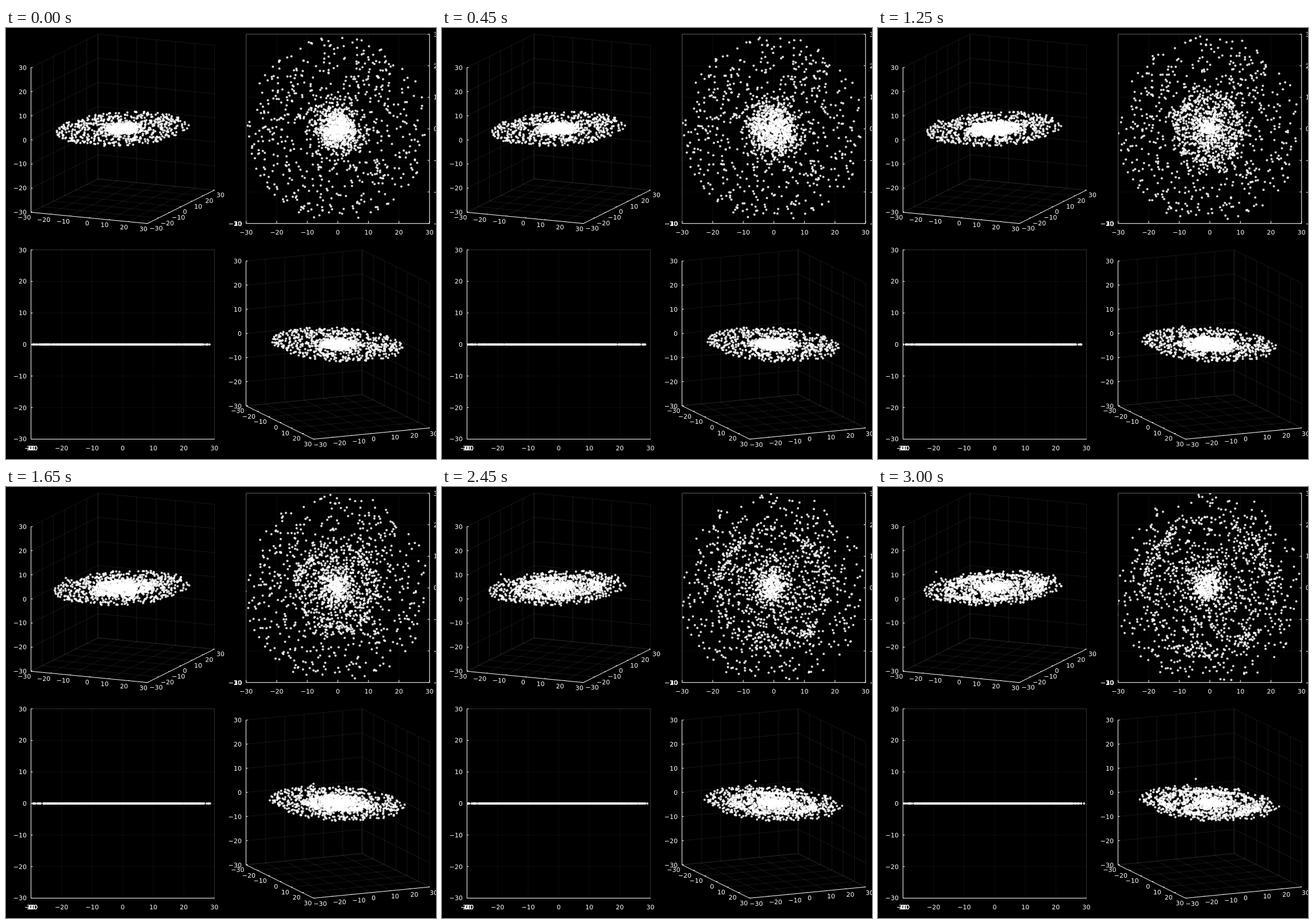
These frames come from a looping animation (748 px wide and 749 px high, 3.05 s). An HTML page with a canvas:

```html
<!DOCTYPE html>
<html lang="en">
<head>
<meta charset="utf-8">
<title>Particle disc, four views</title>
<style>
  html, body { margin: 0; width: 100%; height: 100%; overflow: hidden; background: #000; }
  canvas { display: block; }
</style>
</head>
<body>
<canvas id="stage" width="748" height="749"></canvas>
<script>
const LOOP = 3050, STEP = 50, LIM = 30;
const TICKS = [-30, -20, -10, 0, 10, 20, 30];
const stage = document.getElementById('stage');
const ctx = stage.getContext('2d');

// Each view: centre on screen, pixels per unit along x, y, z, and its clip box.
const views = [
  { c: [203, 175.25], x: [3.375, 0.325], y: [1.942, -0.967], z: [0, -4.192], box: [43.5, 10.5, 319, 330] },
  { c: [577.25, 175.25], x: [5.317, 0], y: [0, -5.483], z: [0, 0], box: [417.75, 10.75, 319, 329] },
  { c: [203, 550], x: [5.317, 0], y: [0, 0], z: [0, -5.483], box: [43.5, 385.5, 319, 329] },
  { c: [577.25, 550], x: [1.958, 0.967], y: [3.367, -0.325], z: [0, -4.192], box: [417.5, 385, 319.5, 330] }
];

const project = (v, x, y, z) => [0, 1].map(i => v.c[i] + x * v.x[i] + y * v.y[i] + z * v.z[i]);

function seeded(s) {
  return () => {
    s = (s + 0x6D2B79F5) | 0;
    let t = Math.imul(s ^ (s >>> 15), 1 | s);
    t = (t + Math.imul(t ^ (t >>> 7), 61 | t)) ^ t;
    return ((t ^ (t >>> 14)) >>> 0) / 4294967296;
  };
}

// ---- Static axes ----

function line(g, v, a, b, color) {
  const p = project(v, ...a), q = project(v, ...b);
  if (Math.hypot(p[0] - q[0], p[1] - q[1]) < 0.5) return;
  g.strokeStyle = color;
  g.beginPath();
  g.moveTo(...p);
  g.lineTo(...q);
  g.stroke();
}

function label(g, n, x, y, align) {
  g.textAlign = align;
  g.fillText(n < 0 ? '\u2212' + -n : String(n), x, y + 4);
}

function drawGrid(g, v) {
  const solid = v.x[1] !== 0;
  const col = solid ? 'rgba(255,255,255,0.085)' : 'rgba(255,255,255,0.05)';
  for (const t of TICKS) {
    if (!solid && Math.abs(t) === LIM) continue;
    line(g, v, [t, -LIM, -LIM], [t, LIM, -LIM], col);
    line(g, v, [t, LIM, -LIM], [t, LIM, LIM], col);
    line(g, v, [-LIM, t, -LIM], [LIM, t, -LIM], col);
    line(g, v, [-LIM, t, -LIM], [-LIM, t, LIM], col);
    line(g, v, [-LIM, -LIM, t], [-LIM, LIM, t], col);
    line(g, v, [-LIM, LIM, t], [LIM, LIM, t], col);
  }
  if (!solid) {
    g.strokeStyle = 'rgba(255,255,255,0.19)';
    g.strokeRect(...v.box);
  }
}

function drawAxes(g, v) {
  const white = '#fff', m = -LIM;
  line(g, v, [m, m, m], [LIM, m, m], white);
  line(g, v, [LIM, m, m], [LIM, LIM, m], white);
  line(g, v, [m, m, m], [m, m, LIM], white);
  for (const t of TICKS) {
    line(g, v, [t, m, m], [t, m + 0.8, m], white);
    line(g, v, [LIM, t, m], [LIM - 0.6, t, m], white);
    if (v.z[1]) {
      const [x, y] = project(v, m, m, t);
      g.fillRect(x, y - 0.5, 3, 1);
    }
  }
}

function drawLabels(g, v, i) {
  for (const t of TICKS) {
    const [xx, xy] = project(v, t, -LIM, -LIM);
    const [yx, yy] = project(v, LIM, t, -LIM);
    const [zx, zy] = project(v, -LIM, -LIM, t);
    label(g, t, zx - 7.5, zy, 'right');
    if (i === 0) {
      label(g, t, xx, xy + 9, 'right');
      label(g, t, yx + 3.5, yy + 8.5, 'left');
    } else if (i === 1) {
      label(g, t, xx, xy + 15.5, 'center');
      label(g, t, yx + 7, yy, 'left');
    } else if (i === 2) {
      label(g, t, xx, xy + 15.5, 'center');
      label(g, t, zx, 730, 'center');
    } else {
      label(g, t, xx - 3, xy + 8.5, 'right');
      label(g, t, yx, yy + 9.5, 'left');
    }
  }
}

function makeBackdrop() {
  const cv = document.createElement('canvas');
  cv.width = stage.width;
  cv.height = stage.height;
  const g = cv.getContext('2d');
  g.fillStyle = '#000';
  g.fillRect(0, 0, cv.width, cv.height);
  g.fillStyle = '#fff';
  g.font = '11px "DejaVu Sans", sans-serif';
  views.forEach((v, i) => {
    drawGrid(g, v);
    drawAxes(g, v);
    drawLabels(g, v, i);
  });
  return cv;
}

// ---- Particles ----

const rnd = seeded(4127);
const bell = () => rnd() + rnd() + rnd() - 1.5;
const rayleigh = s => Math.min(9.5, s * Math.sqrt(-2 * Math.log(1 - rnd())));
const polar = (r, a) => [r * Math.cos(a), r * Math.sin(a)];

// Wide disc, drifting slowly.
function outer() {
  const r0 = 29.6 * Math.pow(rnd(), 0.7), a0 = rnd() * 2 * Math.PI;
  const vr = bell() * 0.6 + 0.25, va = -0.04 + bell() * 1.2 / (r0 + 4);
  return t => polar(r0 + vr * t, a0 + va * t);
}

// Bound core, circling and breathing.
function core() {
  const r0 = rayleigh(3.2), a0 = rnd() * 2 * Math.PI;
  const w = 5 / (r0 + 1.5), e = 0.05 + 0.15 * rnd();
  return t => {
    const [x, y] = polar(r0 * (1 - e + e * Math.cos(1.4 * w * t)), a0 - w * t);
    return [x - 0.2 * t, y + 0.25 * t];
  };
}

// Thrown out of the core, gathering into a growing ring.
function shell() {
  const r0 = rayleigh(3.2), a0 = rnd() * 2 * Math.PI;
  const v = 6.3 * (1 - 0.8 * Math.pow(rnd(), 3)), turn = 0.5 + 0.4 * rnd();
  return t => {
    const r = r0 + (2.6 - r0) * 0.24 * t + v * t;
    return polar(r, a0 - turn * (1 - Math.exp(-1.2 * t)) + 0.04 * Math.sin(3 * a0) * t);
  };
}

const repeat = (n, make) => Array.from({ length: n }, make);
const particles = [
  ...repeat(760, outer),
  ...repeat(380, core),
  ...repeat(420, shell),
  t => [-26 - 4.35 * t, -3.9 + 6.45 * t]   // the one that escapes
];

// ---- Playback ----

const backdrop = makeBackdrop();

function draw(t) {
  ctx.drawImage(backdrop, 0, 0);
  ctx.fillStyle = 'rgba(255,255,255,0.85)';
  const spots = particles.map(p => p(t));
  for (const v of views) {
    ctx.save();
    ctx.beginPath();
    ctx.rect(...v.box);
    ctx.clip();
    for (const [x, y] of spots) {
      const [px, py] = project(v, x, y, 0);
      ctx.beginPath();
      ctx.arc(px, py, 2, 0, 2 * Math.PI);
      ctx.fill();
    }
    ctx.restore();
  }
}

const start = performance.now();
let shown = -1;

function tick() {
  const step = Math.floor(((performance.now() - start) % LOOP) / STEP);
  if (step !== shown) {
    shown = step;
    draw(step * STEP / 1000);
  }
  requestAnimationFrame(tick);
}
tick();
</script>
</body>
</html>
```
